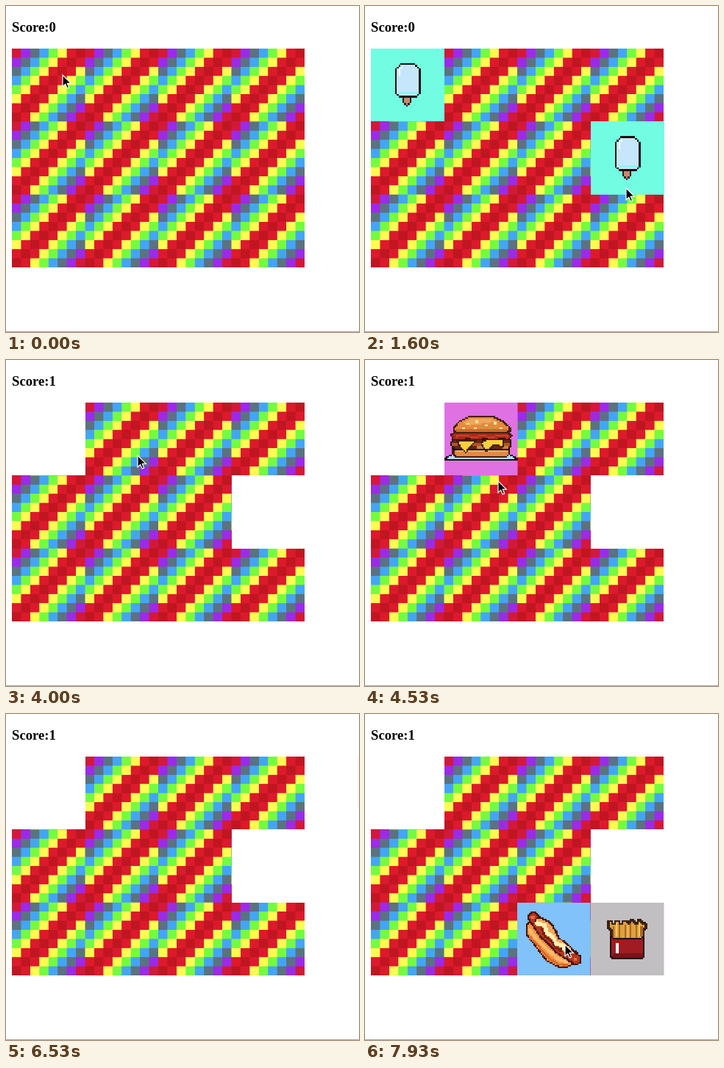
Write an HTML page with a canvas that moves like this. It is 480 px wide and 444 px high and loops after 8000 ms.

```html
<!DOCTYPE html>
<html lang="en">
<head>
<meta charset="utf-8">
<title>Memory game</title>
<style>
  html, body { margin: 0; width: 100%; height: 100%; overflow: hidden; background: #fff; }
  #stage { position: relative; width: 480px; height: 444px; overflow: hidden; }
  #stage > * { position: absolute; }
  h3 { margin: 0; left: 8px; top: 18px; font: bold 18.72px/21px "Liberation Serif", "Times New Roman", serif; color: #000; white-space: pre; }
  h3 span { position: absolute; }
  #board { left: 8px; top: 57.5px; width: 398px; height: 298.5px; }
  .tile {
    left: calc(8px + var(--c) * 99.5px); top: calc(57.5px + var(--r) * 99.5px);
    width: 100px; height: 99.5px; image-rendering: pixelated;
  }
  .gone { background: #fff; }
  #rule { left: 0; top: 443px; width: 480px; height: 1px; background: #a9a9a9; }
  #shade { right: 0; top: 58px; width: 4px; height: 70px; background: linear-gradient(90deg, #fff, #f4f4f4); }
  #cursor { left: 0; top: 0; overflow: visible; }

  .tile, h3 span, #shade { animation: 8s step-end infinite; }
  #pop1 { animation-name: pop1; }
  #pop2 { animation-name: pop2; }
  #burger { animation-name: burger; }
  #pizza { animation-name: pizza; }
  #fries { animation-name: fries; }
  #hotdog { animation-name: hotdog; }
  #stage .gone, #one { animation-name: matched; }
  #zero { animation-name: unmatched; }
  #shade { animation-name: shade; }
  #cursor { animation: move 8s ease-in-out infinite, cursor 8s step-end infinite; }

  @keyframes pop1 { 0% { opacity: 0 } 5%, 100% { opacity: 1 } }
  @keyframes pop2 { 0% { opacity: 0 } 19.1%, 100% { opacity: 1 } }
  @keyframes matched { 0% { opacity: 0 } 39.95%, 100% { opacity: 1 } }
  @keyframes unmatched { 0% { opacity: 1 } 39.95%, 100% { opacity: 0 } }
  @keyframes burger { 0%, 81.6%, 100% { opacity: 0 } 51.6% { opacity: 1 } }
  @keyframes pizza { 0%, 81.6%, 100% { opacity: 0 } 65% { opacity: 1 } }
  @keyframes fries { 0% { opacity: 0 } 90%, 100% { opacity: 1 } }
  @keyframes hotdog { 0% { opacity: 0 } 98.3%, 100% { opacity: 1 } }
  @keyframes shade { 0%, 43.3%, 83.3%, 100% { opacity: 0 } 32.5%, 77.5% { opacity: 1 } }
  @keyframes cursor { 0%, 43.3%, 82.1%, 100% { opacity: 1 } 27.5%, 73.4% { opacity: 0 } }
  @keyframes move {
    0%, .9% { transform: translate(77px, 94px) }
    7.5%, 10% { transform: translate(70px, 98px) }
    14.5% { transform: translate(205px, 120px); animation-timing-function: ease-out }
    19.9%, 26.5% { transform: translate(355px, 248px) }
    27.5% { transform: translate(385px, 215px) }
    43.3% { transform: translate(474px, 160px); animation-timing-function: ease-out }
    47.5% { transform: translate(190px, 125px) }
    50%, 55.4% { transform: translate(179px, 130px); animation-timing-function: ease-in }
    56.6% { transform: translate(181px, 164px); animation-timing-function: ease-out }
    61.6% { transform: translate(173px, 225px) }
    64.5%, 70.8% { transform: translate(172px, 230px) }
    73.4% { transform: translate(383px, 130px) }
    82.1% { transform: translate(470px, 170px); animation-timing-function: ease-out }
    87.5%, 93.3% { transform: translate(352px, 304px) }
    97.5%, 100% { transform: translate(272px, 314px) }
  }
</style>
</head>
<body>
<div id="stage">
  <h3>Score:<span id="zero">0</span><span id="one">1</span></h3>
  <canvas id="board" width="512" height="384"></canvas>
  <canvas class="tile" id="pop1" style="--c:0;--r:0"></canvas>
  <canvas class="tile" id="pop2" style="--c:3;--r:1"></canvas>
  <canvas class="tile" id="burger" style="--c:1;--r:0"></canvas>
  <canvas class="tile" id="pizza" style="--c:1;--r:1"></canvas>
  <canvas class="tile" id="hotdog" style="--c:2;--r:2"></canvas>
  <canvas class="tile" id="fries" style="--c:3;--r:2"></canvas>
  <div class="tile gone" style="--c:0;--r:0"></div>
  <div class="tile gone" style="--c:3;--r:1"></div>
  <div id="shade"></div>
  <div id="rule"></div>
  <svg id="cursor" width="13" height="20">
    <path d="M0 0V15.8L3.7 12.4L6.2 18L8.7 16.9L6.3 11.4H11.3Z" stroke="#fff" stroke-width="1.2"/>
  </svg>
</div>
<script>
const $ = id => document.getElementById(id);

// Each card back is an 8 by 8 pattern of mirrored diagonal stripes.
const stripes = ['#d2193a', '#9b2be8', '#5b7281', '#44a5f6', '#74fb40', '#fdfb52', '#dc1a2c', '#c01622'];
const board = $('board').getContext('2d');
for (let y = 0; y < 24; y++) {
  for (let x = 0; x < 32; x++) {
    const d = x % 8 + y % 8;
    board.fillStyle = stripes[Math.min(d, 14 - d)];
    board.fillRect(x * 16, y * 16, 16, 16);
  }
}

// Rasterises 100-unit paths onto an n by n grid without antialiasing.
function card(id, n, ground, shapes) {
  const canvas = $(id);
  canvas.width = canvas.height = n;
  const g = canvas.getContext('2d');
  const unit = 100 / n;
  g.fillStyle = ground;
  g.fillRect(0, 0, n, n);
  g.lineJoin = g.lineCap = 'round';
  for (const [d, fill, line, width = unit * 1.1] of shapes) {
    const path = new Path2D(d);
    g.lineWidth = width;
    for (let y = 0; y < n; y++) {
      for (let x = 0; x < n; x++) {
        const px = (x + .5) * unit, py = (y + .5) * unit;
        const color = line && g.isPointInStroke(path, px, py) ? line
          : fill && g.isPointInPath(path, px, py) ? fill : null;
        if (!color) continue;
        g.fillStyle = color;
        g.fillRect(x, y, 1, 1);
      }
    }
  }
}

const ink = '#1c1010';
const pop = [
  ['M43.5 66V74L49 79L54 74V66Z', '#c68a6c', '#33191a'],
  ['M41 21H59L66 29V61L61 66H39L34 61V29Z', '#c5e6fb', ink],
  ['M37 60H64V63H37Z', '#8ff5ee'],
  ['M37 28H40V38H37ZM40 25H43V28H40Z', '#fff']
];
card('pop1', 40, '#72fde3', pop);
card('pop2', 40, '#72fde3', pop);

card('burger', 50, '#e071e3', [
  ['M8 73H92L100 77H0Z', '#b4dcf2'],
  ['M1 77L8 73M99 77L92 73M0 79H100', null, ink],
  ['M12 65H89V71L85 75H16L12 71Z', '#e58a3d', '#4a1d0d'],
  ['M16 66H86V68H16Z', '#f4b168'],
  ['M11 50H90L92 58L88 65H13L9 58Z', '#6a2514', ink],
  ['M11 57H90V60H11Z', '#b0542c'],
  ['M44 60H58V64H44ZM80 60H88V63H80Z', '#c8843c'],
  ['M16 52H43L29 69L22 62Z', '#f9cf3c', '#44200c'],
  ['M50 56L60 50H80L82 62L70 58L58 67Z', '#f9cf3c', '#44200c'],
  ['M9 44L14 41H88L92 45L88 51L78 49L68 52L56 49L44 52L32 49L22 52L12 50Z', '#a92a1b', '#3a0e0c'],
  ['M16 46L28 45L40 47L52 45L64 47L76 45L88 46', null, '#cf3f28'],
  ['M13 40V34L20 26L34 19H67L81 26L90 34V40Z', '#e58a3d', '#43200f'],
  ['M24 28L37 22H64L72 26L50 29L35 31Z', '#f0a65c'],
  ['M16 37H86V39H16Z', '#cf6c2c'],
  ['M30 28H33V30H30ZM43 25H46V27H43ZM56 30H59V32H56ZM69 27H72V29H69ZM40 34H43V36H40ZM76 34H79V36H76ZM24 34H27V36H24Z', '#fbe6a8'],
  ['M50 32H53V34H50ZM65 34H68V36H65Z', '#80b65a']
]);

card('pizza', 50, '#d990a9', [
  ['M25 26L44 28L66 37L79 44L74 50L62 49L60 56L66 64L67 75L63 78L59 74L58 64L54 60L51 69L42 71L39 76L45 83L46 92L41 96L37 93L34 82L30 75L26 78L24 86L13 87L13 76L16 66L18 52L21 40Z', '#fad23f', '#3b180c'],
  ['M26 26L40 28L42 33L35 37L26 35Z', '#d3212a', '#7a1512'],
  ['M58 36L72 40L72 47L62 48L54 42Z', '#d3212a', '#7a1512'],
  ['M42 57L50 55L55 60L51 68L43 70L39 65Z', '#d3212a', '#7a1512'],
  ['M18 50L27 52L29 62L25 72L16 73L16 62Z', '#d3212a', '#7a1512'],
  ['M44 36L54 47L60 52M38 40L34 50L32 66', null, '#f0a334', 2.6],
  ['M46 44L53 50M20 77V82M37 79L41 88', null, '#fff08a', 2.2],
  ['M23 17L25 10L33 7L46 8L72 15L86 22L89 29L89 40L83 49L76 44L64 37L44 28L26 26Z', '#e99a36', '#3b180c'],
  ['M30 23L45 25L66 33L82 42', null, '#cf7f28', 4],
  ['M30 13L46 14L70 21L83 29', null, '#f2b248', 6],
  ['M29 12H46V15H34V18H29Z', '#fff4dc']
]);

card('hotdog', 50, '#80c2f9', [
  ['M12 30L20 24L30 23L43 28L52 39L54 48L71 61L84 70L76 85L68 89L56 88L40 80L27 63L14 45Z', '#ef9345', '#4b140b'],
  ['M22 20L36 41L56 62L81 78', null, '#4b140b', 16],
  ['M22 20L36 41L56 62L81 78', null, '#b5371c', 11],
  ['M30 24L42 30L50 41L54 51L70 64', null, '#4b140b', 11],
  ['M30 25L41 31L49 42L54 52L70 65', null, '#f3a75c', 8],
  ['M27 28L37 31L40 41L49 47L53 56L63 60L68 68', null, '#fff0b0', 6],
  ['M33 35L38 46L46 52L51 61L60 66', null, '#7c1d10', 3],
  ['M17 37L27 51L43 67L57 78L68 82', null, '#ffb768', 5],
  ['M18 48L31 63L43 77L57 85L68 86', null, '#d8672b', 3],
  ['M19 18H23V21H19ZM78 76H82V79H78Z', '#e66842']
]);

card('fries', 50, '#c2bfc3', [
  ['M24 25H29V29H33V25H39V29H43V25H50V28H54V24H60V28H65V24H70V28H76V36H73V50H28V36H24Z', '#dfa041', '#3a200f'],
  ['M31 33V47M39 31V48M47 32V48M55 30V48M63 31V48M70 33V46', null, '#a9691f', 2.4],
  ['M35 30V44M51 31V46M67 29V44', null, '#f3c765', 2.2],
  ['M27 47L33 49H67L73 47V74L70 77H30L27 74Z', '#a01c22', ink],
  ['M30 70H71V75H30Z', '#7c1219'],
  ['M34 57H38V69H34Z', '#fff']
]);
</script>
</body>
</html>
```
